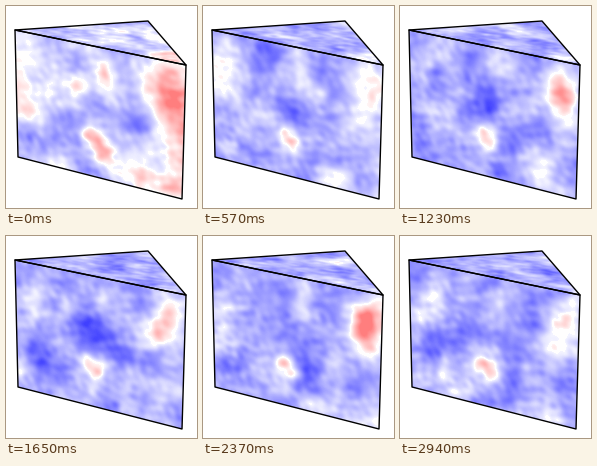
Animation, 191 px wide and 202 px high, one loop 2970 ms. Source, as a matplotlib script:

```python
import numpy as np
import matplotlib.pyplot as plt
from matplotlib.animation import FuncAnimation
from matplotlib.patches import Polygon

W, H, DPI = 191, 202, 100
FRAMES, INTERVAL = 99, 30
SETTLE, PULSE = 14, 40  # frames

FRONT = np.array([(9, 24), (180, 59), (176, 193), (12, 151)], float)
TOP = np.array([(9, 24), (142, 15), (180, 59)], float)
OUTLINE = [FRONT[0], TOP[1], FRONT[1], FRONT[2], FRONT[3]]

px, py = np.meshgrid(np.arange(W) + 0.5, np.arange(H) + 0.5)
on_top = py < 24 + 35 / 171 * (px - 9)


def unproject(quad, square):
    """Perspective map from the drawn quad back to face coordinates."""
    rows, rhs = [], []
    for (x, y), (u, v) in zip(quad, square):
        rows += [[x, y, 1, 0, 0, 0, -u * x, -u * y],
                 [0, 0, 0, x, y, 1, -v * x, -v * y]]
        rhs += [u, v]
    m = np.append(np.linalg.solve(rows, rhs), 1)
    d = m[6] * px + m[7] * py + m[8]
    return (m[0] * px + m[1] * py + m[2]) / d, (m[3] * px + m[4] * py + m[5]) / d


def solid_coords():
    """Position inside the wedge for every visible pixel."""
    u, v = unproject(FRONT, [(0, 0), (1, 0), (1, 0.8), (0, 0.8)])
    affine = np.linalg.solve(np.c_[TOP, np.ones(3)], [(0, 0), (0.5, 0.7), (1, 0)])
    top = np.stack([px, py, np.ones_like(px)], -1) @ affine
    return np.stack([np.where(on_top, top[..., 0], u),
                     np.where(on_top, 0, v),
                     np.where(on_top, top[..., 1], 0)], -1)


# Random waves through the solid, each drifting at its own rate
rng = np.random.default_rng(12)
MODES = 180
cycles = 2.5 * 9 ** rng.random(MODES)
axis = rng.normal(size=(MODES, 3))
axis /= np.linalg.norm(axis, axis=1)[:, None]
amp = cycles ** -0.6
amp *= 0.1 / np.sqrt((amp ** 2).sum() / 2)
rate = rng.normal(0, 0.17, MODES)
phase = solid_coords() @ (2 * np.pi * cycles[:, None] * axis).T
phase += rng.uniform(0, 2 * np.pi, MODES)
wave_cos = np.cos(phase) * amp
wave_sin = np.sin(phase) * amp


def patch(x, y, sx, sy, top=False):
    g = np.exp(-((px - x) / sx) ** 2 / 2 - ((py - y) / sy) ** 2 / 2)
    return g * (on_top == top)


# Each patch: shape, strength at the start, strength once settled
patches = [
    (patch(178, 120, 20, 55), 0.42, 0.04),
    (patch(135, 172, 18, 10), 0.25, 0.08),
    (patch(82, 127, 6, 6), 0.48, 0.40),
    (patch(91, 137, 6, 6), 0.48, 0.40),
    (patch(99, 148, 6, 7), 0.45, 0.00),
    (patch(98, 67, 6, 9), 0.30, 0.20),
    (patch(68, 83, 7, 7), 0.25, 0.06),
    (patch(16, 75, 12, 24), 0.26, 0.12),
    (patch(32, 128, 14, 14), -0.30, -0.14),
    (patch(84, 94, 15, 15), -0.16, -0.12),
    (patch(112, 138, 10, 16), -0.16, -0.06),
    (patch(160, 52, 16, 7, top=True), 0.35, 0.12),
    (np.ones((H, W)), -0.20, -0.32),
]
shapes = np.stack([p[0] for p in patches], -1)
start, rest = np.array([p[1:] for p in patches]).T
warm = patch(162, 88, 12, 16)


def field(i):
    fade = np.exp(-i / SETTLE)
    pulse = 0.54 + 0.17 * np.cos(2 * np.pi * i / PULSE)
    mean = shapes @ (rest + (start - rest) * fade) + warm * pulse * (1 - 0.6 * fade)
    f = mean + wave_cos @ np.cos(rate * i) - wave_sin @ np.sin(rate * i)
    # thin white band where the sign changes
    return np.clip(np.where(np.abs(f) < 0.04, 0, f), -0.75, 0.5)


fig = plt.figure(figsize=(W / DPI, H / DPI), dpi=DPI, facecolor="white")
ax = fig.add_axes([0, 0, 1, 1])
ax.axis("off")
img = ax.imshow(field(0), cmap="bwr", vmin=-1, vmax=1, extent=(0, W, H, 0),
                interpolation="nearest", aspect="auto")
img.set_clip_path(Polygon(OUTLINE, transform=ax.transData))
for face in (TOP, FRONT):
    ax.add_patch(Polygon(face, fill=False, ec="black", lw=1, joinstyle="round"))
ax.set(xlim=(0, W), ylim=(H, 0))


def draw(i):
    img.set_data(field(i))
    return (img,)


anim = FuncAnimation(fig, draw, frames=FRAMES, interval=INTERVAL,
                     repeat=True, repeat_delay=0)
plt.show()
```
